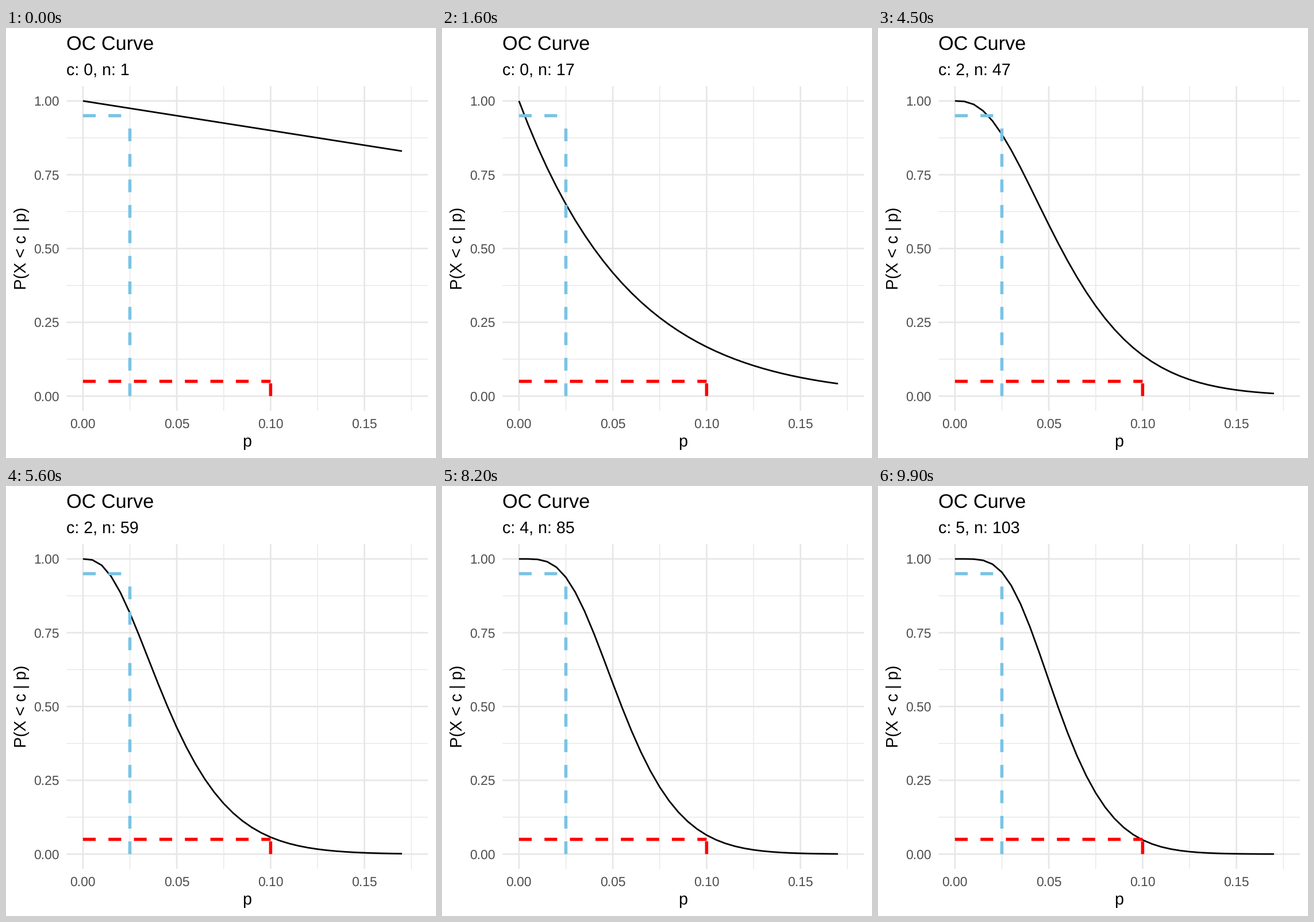
Animation, 748 px wide and 748 px high, one loop 10000 ms. Source, as a matplotlib script:

```python
from math import comb

import matplotlib.pyplot as plt
import numpy as np
from matplotlib.animation import FuncAnimation

plt.rcParams.update({
    "font.family": "Liberation Sans",
    "text.hinting": "none",
    "path.snap": False,
    "lines.solid_capstyle": "butt",
    "lines.dash_capstyle": "butt",
    "lines.solid_joinstyle": "round",
})

SIZE, DPI = 748, 187
FRAMES = 100
LEFT, RIGHT, TOP, BOTTOM = 105.3, 733.7, 101.2, 666.0   # panel edges in pixels
X_LIM, Y_LIM = (-0.00875, 0.18375), (-0.05, 1.05)
GRID, AXIS, SKY = "#e7e7e7", "#4d4d4d", "#79c3e4"
LW = 2.845 * 72 / 96                                    # one width unit in points
GOOD, BAD = 0.025, 0.10
ALPHA, BETA = 0.05, 0.05


def accept(c, n, p):
    """Probability of at most c defects in a sample of n."""
    return sum(comb(n, k) * p**k * (1 - p)**(n - k) for k in range(c + 1))


def search_plans():
    """Grow n, raising c each time the consumer risk is met."""
    plans, c, n = [], 0, 1
    while True:
        plans.append((c, n))
        if accept(c, n, BAD) <= BETA:
            if accept(c, n, GOOD) >= 1 - ALPHA:
                return plans
            c += 1
        n += 1


fig = plt.figure(figsize=(SIZE / DPI, SIZE / DPI), dpi=DPI, facecolor="white")
ax = fig.add_axes([LEFT / SIZE, 1 - BOTTOM / SIZE,
                   (RIGHT - LEFT) / SIZE, (BOTTOM - TOP) / SIZE])
ax.set(xlim=X_LIM, ylim=Y_LIM)
ax.axis("off")


def px(x):
    return LEFT + (x - X_LIM[0]) / (X_LIM[1] - X_LIM[0]) * (RIGHT - LEFT)


def py(y):
    return BOTTOM - (y - Y_LIM[0]) / (Y_LIM[1] - Y_LIM[0]) * (BOTTOM - TOP)


def label(x, y, text, size=11, color="black", **kw):
    return fig.text(x / SIZE, 1 - y / SIZE, text, fontsize=size, color=color,
                    va="baseline", **kw)


def segment(xs, ys, color, width, z, **kw):
    ax.plot(xs, ys, color=color, lw=width * LW, zorder=z, snap=False, **kw)


def grid(xs, ys, width, z):
    for y in ys:
        segment(X_LIM, (y, y), GRID, width, z)
    for x in xs:
        segment((x, x), Y_LIM, GRID, width, z)


x_ticks = np.arange(4) * 0.05
y_ticks = np.arange(5) * 0.25
grid(x_ticks + 0.025, y_ticks[:-1] + 0.125, 0.25, 1)
grid(x_ticks, y_ticks, 0.5, 2)

for x in x_ticks:
    label(px(x), 695.4, f"{x:.2f}", 8.8, AXIS, ha="center")
for y in y_ticks:
    label(LEFT - 12.9, py(y) + 8.2, f"{y:.2f}", 8.8, AXIS, ha="right")

label(LEFT, 38.8, "OC Curve", 13.2)
subtitle = label(LEFT, 80.8, "")
label((LEFT + RIGHT) / 2, 727.6, "p", ha="center")
label(34.7, (TOP + BOTTOM) / 2, "P(X < c | p)", ha="center",
      rotation=90, rotation_mode="anchor")

for p, level, color in ((GOOD, 1 - ALPHA, SKY), (BAD, BETA, "red")):
    segment((0, p), (level, level), color, 1, 4, dashes=(4, 4))
    segment((p, p), (0, level), color, 1, 4, dashes=(4, 4))

p_grid = np.linspace(0, 0.17, 35)
curve, = ax.plot([], [], color="black", lw=0.5 * LW, zorder=3)
plans = search_plans()


def update(i):
    c, n = plans[round(i * (len(plans) - 1) / (FRAMES - 1))]
    curve.set_data(p_grid, accept(c, n, p_grid))
    subtitle.set_text(f"c: {c}, n: {n}")
    return curve, subtitle


anim = FuncAnimation(fig, update, frames=FRAMES, interval=100,
                     repeat=True, repeat_delay=0)
plt.show()
```
